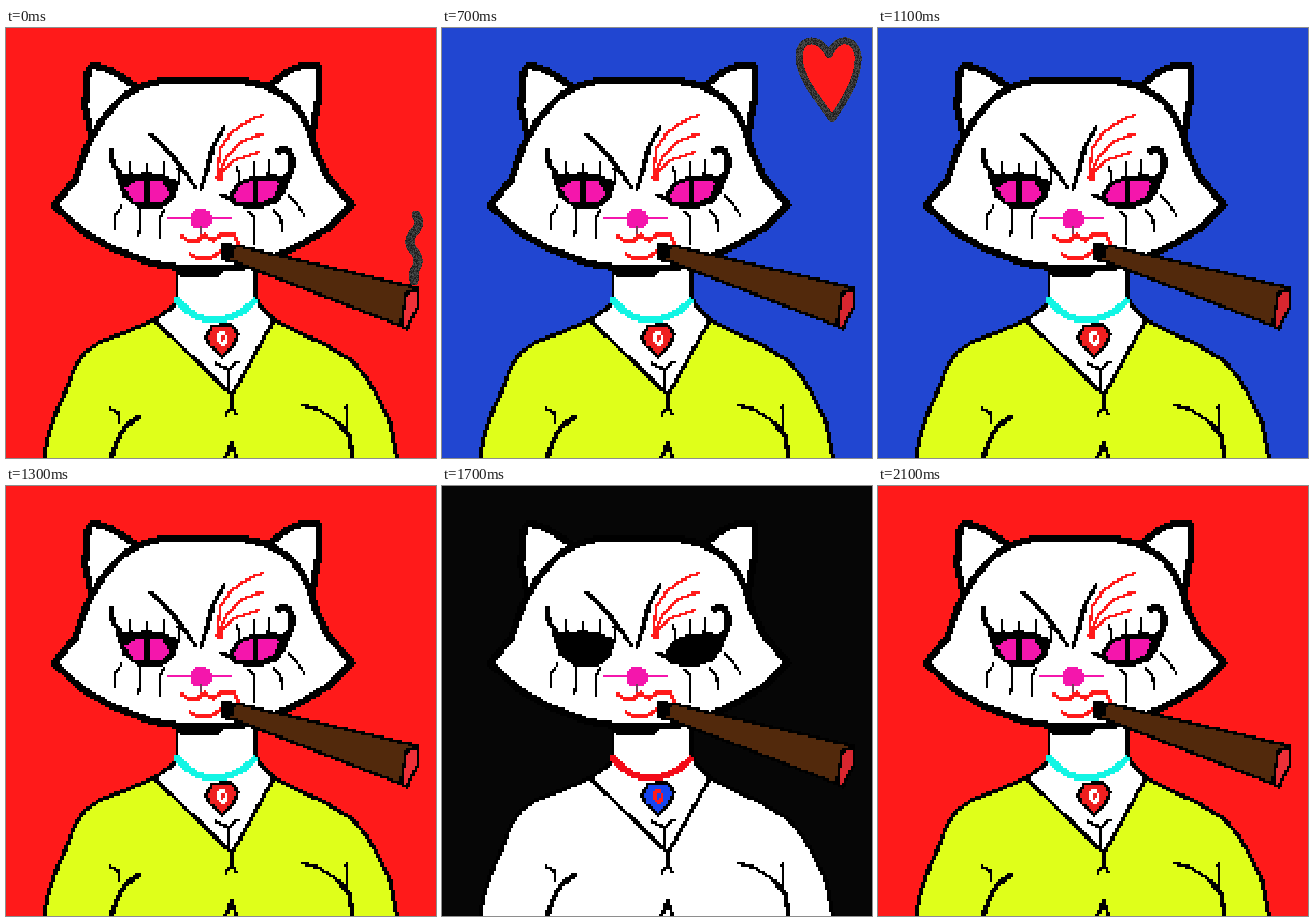
An HTML page with a canvas for the animation above (2.3 s loop, 430 px wide and 430 px high).

```html
<!DOCTYPE html>
<html lang="en">
<head>
<meta charset="utf-8">
<title>Cat with cigar</title>
<style>
html, body { margin: 0; width: 100%; height: 100%; overflow: hidden; }
canvas { display: block; width: 430px; height: 430px; }
</style>
</head>
<body>
<canvas id="stage" width="430" height="430"></canvas>
<script>
const SIZE = 430, GRID = 200, CELL = SIZE / GRID, LOOP = 2300;
const RED = '#ff1a1a', BLUE = '#2146d1', NIGHT = '#060606', LIME = '#dfff1a',
  PINK = '#f416ac', CYAN = '#12f5e4', EMBER = '#d8262f', BLACK = '#000', WHITE = '#fff';

const stage = document.getElementById('stage').getContext('2d');
const makeCanvas = size => {
  const c = document.createElement('canvas');
  c.width = c.height = size;
  return c.getContext('2d');
};
const probe = makeCanvas(1);

// Aliased mask of a path: one unit square per covered cell.
function pixelate(d, width, cells = GRID) {
  const path = new Path2D(d), mask = new Path2D(), step = SIZE / cells;
  const nums = d.match(/-?[\d.]+/g).map(Number);
  const span = axis => {
    const v = nums.filter((_, i) => i % 2 === axis);
    const clip = n => Math.max(0, Math.min(cells, n));
    return [clip(Math.floor((Math.min(...v) - width) / step)), clip(Math.ceil((Math.max(...v) + width) / step))];
  };
  const [x0, x1] = span(0), [y0, y1] = span(1);
  probe.lineWidth = width || 1;
  probe.lineJoin = probe.lineCap = 'round';
  const points = [];
  for (let y = y0; y < y1; y++) for (let x = x0; x < x1; x++) {
    const px = (x + .5) * step, py = (y + .5) * step;
    if (width ? probe.isPointInStroke(path, px, py) : probe.isPointInPath(path, px, py)) {
      mask.rect(x, y, 1, 1);
      points.push([x, y]);
    }
  }
  return { mask, points };
}

const layers = [];
const fill = (color, d) => layers.push({ color, ...pixelate(d, 0) });
const line = (color, width, ...paths) =>
  paths.forEach(d => layers.push({ color, ...pixelate(d, width) }));
const oval = (x, y, rx, ry) =>
  `M${x - rx} ${y}Q${x - rx} ${y - ry} ${x} ${y - ry}Q${x + rx} ${y - ry} ${x + rx} ${y}` +
  `Q${x + rx} ${y + ry} ${x} ${y + ry}Q${x - rx} ${y + ry} ${x - rx} ${y}Z`;

// Body
const shoulders = 'M148 292L118 305L96 313L78 325L68 340L62 358L50 385L42 408L37 434';
const rightSide = 'M268 292L292 304L318 316L345 332L360 349L371 368L384 395L392 434';
fill('jacket', shoulders + 'L392 434L384 395L371 368L360 349L345 332L318 316L292 304L268 292L226 367Z');
fill(WHITE, 'M171 240L249 240L249 270L268 292L226 367L148 292L171 272Z');
line(BLACK, 4, shoulders, rightSide, 'M148 292L226 367L268 292',
  'M171 246L171 268L167 279L148 292', 'M249 240L249 269L254 278L268 292');
line(BLACK, 3, 'M226 367L226 377L220 387M226 377L230 385',
  'M209 335L222 341L232 334M222 341L222 360', 'M104 380L112 384L113 395',
  'M296 377L312 381L334 396', 'M340 378L341 400');
line(BLACK, 5, 'M133 389L121 397L112 410L105 430', 'M334 397L343 407L347 430');
fill(BLACK, 'M217 430L226 410L233 430L228 430L226 420L222 430Z');
line('necklace', 7, 'M171 272Q186 291 208 292Q232 291 248 273');

// Pendant
fill(BLACK, 'M206 296L226 295L234 306L230 317L217 331L203 319L198 309Z');
fill('pendant', 'M207 299L225 299L230 307L226 316L216 327L205 317L202 309Z');
fill('gem', 'M212 304L220 304L221 315L217 319L211 314Z');
fill('pendant', 'M214 307L219 307L218 313L214 313Z');

// Ears and head
const leftEar = 'M85 108L79 78L82 42L87 37L104 42L131 59';
const rightEar = 'M261 59L284 42L299 37L312 38L313 68L305 112';
const head = 'M48 177L69 152L79 124Q94 88 121 66Q139 54 165 52L235 53Q272 57 291 80' +
  'Q304 99 308 119L321 148L346 177L324 199L292 218L266 230L242 238Q195 245 145 235L105 220L76 203Z';
fill(WHITE, leftEar + 'L100 95Z');
fill(WHITE, rightEar + 'L290 80Z');
line(BLACK, 7, leftEar, rightEar);
fill(WHITE, head);
line(BLACK, 7, head);
line(BLACK, 5, 'M174 246L213 246');

// Brows and painted strokes
line(BLACK, 4, 'M144 106L157 117L168 130L190 160', 'M218 99L208 117L202 139L195 161');
line(BLACK, 5, 'M154 116L168 130L181 147', 'M206 122L201 142');
line(RED, 3, 'M211 150L214 121L225 105L240 94L257 87', 'M212 149L221 128L236 113L256 106',
  'M214 147L228 132L252 124');
fill(RED, 'M210 140L218 140L218 153L210 153Z');

// Eyes
const leftEye = 'M108 143L121 148L140 144L159 147L174 154L168 171L157 180L132 180L117 169Z';
const rightEye = 'M284 149L268 147L246 148L232 153L220 171L230 179L252 181L270 176L280 164Z';
fill(BLACK, leftEye);
fill(BLACK, rightEye);
line(BLACK, 5, 'M105 123L107 137L116 148L125 150', 'M216 167L224 171');
line(BLACK, 7, 'M272 123Q284 119 286 132Q287 146 278 151');
fill('iris', 'M119 160L130 153L156 153L164 166L155 175L129 175Z');
fill('iris', 'M228 167L237 155L252 152L273 154L268 168L254 175L231 175Z');
line(BLACK, 5, 'M141 151L141 176', 'M249 151L249 176');
line(BLACK, 2.6, 'M123 135L125 147', 'M140 136L141 147', 'M158 134L157 148', 'M172 140L174 153',
  'M231 138L234 151', 'M249 134L249 148', 'M264 133L262 148',
  'M116 178L109 187L109 201', 'M135 182L133 208', 'M158 181L153 191L153 210',
  'M242 183L249 190L249 217', 'M267 181L275 191L276 203', 'M282 167L291 176L298 187');

// Nose and mouth
line(PINK, 3, 'M162 190L225 190');
fill(PINK, oval(195, 191, 11, 10));
line('#704058', 2.5, 'M195 200L195 207');
line(RED, 4, 'M176 208L184 214L192 212L198 207L207 212L216 206L228 207L233 216',
  'M184 226L191 230L205 230L214 224');

// Cigar
const cigar = 'M217 217L232 218L412 260L411 280L401 301L393 297L232 235L217 231Z';
fill('#52290c', cigar);
fill('tip', 'M400 265L412 260L411 280L402 300L396 296Z');
line(BLACK, 3, cigar, 'M412 261L400 265L395 297');
fill(BLACK, 'M217 217L230 218L227 231L217 231Z');

// Charcoal marks, drawn at full resolution
const lowSmoke = pixelate('M410 187Q416 196 408 204Q400 214 408 223Q416 233 408 243L408 253', 9, SIZE);
const highSmoke = pixelate('M405 96Q396 108 400 121Q410 143 406 163Q397 176 398 188', 9, SIZE);
const heart = 'M387 27C379 8 357 8 357 29C358 51 375 69 390 91C405 69 417 49 416 28C413 8 394 8 387 27Z';
const heartFill = pixelate(heart, 0, SIZE);
const heartEdge = pixelate(heart, 7, SIZE);
const hash = (x, y) => {
  const n = Math.sin(x * 12.9898 + y * 78.233) * 43758.5453;
  return n - Math.floor(n);
};
function charcoal(ctx, { points }) {
  for (const [x, y] of points) {
    const g = 28 + Math.floor(hash(x, y) * 5) * 12;
    ctx.fillStyle = `rgb(${g},${g},${g})`;
    ctx.fillRect(x, y, 1, 1);
  }
}

const base = { sky: BLUE, jacket: LIME, necklace: CYAN, pendant: '#ef2020', gem: WHITE, iris: PINK, tip: EMBER };
const red = { sky: RED, tip: '#ee3038' };
const night = { sky: NIGHT, jacket: WHITE, necklace: '#f30b18', pendant: '#1745f0', gem: RED, iris: BLACK };
const timeline = [
  [0, { ...red, smoke: lowSmoke }],
  [100, { tip: '#e5d51a', smoke: lowSmoke }],
  [300, { tip: '#e5d51a', smoke: highSmoke }],
  [500, { jacket: PINK, smoke: highSmoke }],
  [700, { heart: RED }],
  [1000, { jacket: PINK, heart: PINK, heartEdge: RED }],
  [1100, {}],
  [1300, red],
  [1500, {}],
  [1600, red],
  [1700, night],
  [2000, {}],
  [2100, red]
].map(([start, look]) => ({ start, picture: paint({ ...base, ...look }) }));

function paint(look) {
  const small = makeCanvas(GRID), full = makeCanvas(SIZE);
  small.fillStyle = look.sky;
  small.fillRect(0, 0, GRID, GRID);
  for (const { color, mask } of layers) {
    small.fillStyle = look[color] || color;
    small.fill(mask);
  }
  full.imageSmoothingEnabled = false;
  full.drawImage(small.canvas, 0, 0, SIZE, SIZE);
  if (look.smoke) charcoal(full, look.smoke);
  if (look.heart) {
    full.fillStyle = look.heart;
    full.fill(heartFill.mask);
    if (look.heartEdge) {
      full.fillStyle = look.heartEdge;
      full.fill(heartEdge.mask);
    } else charcoal(full, heartEdge);
  }
  return full.canvas;
}

const origin = performance.now();
function render(now) {
  const t = Math.max(0, now - origin) % LOOP;
  const scene = timeline.findLast(s => s.start <= t);
  stage.drawImage(scene.picture, 0, 0);
  requestAnimationFrame(render);
}
render(origin);
</script>
</body>
</html>
```
